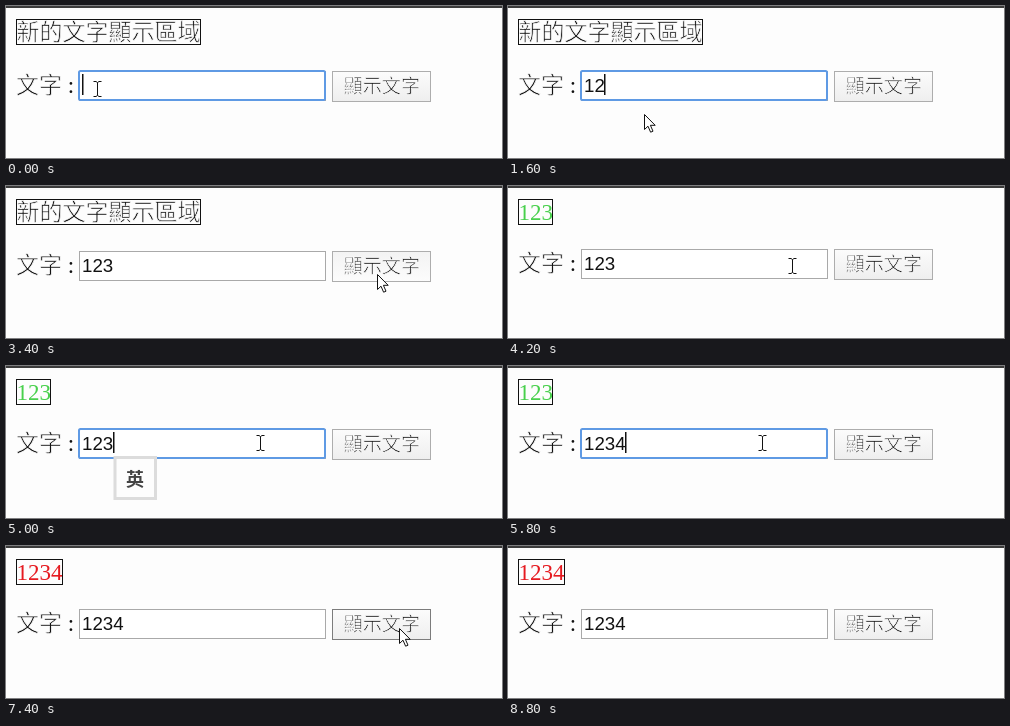
An HTML page that plays this animation: 496 px wide and 152 px high, repeating every 10000 ms.

```html
<!DOCTYPE html>
<html lang="zh-Hant">
<head>
<meta charset="utf-8">
<style>
  html, body { margin: 0; width: 100%; height: 100%; overflow: hidden; background: #fdfdfd; }
  svg { display: block; }
  .page { font: 300 23px "Liberation Serif", "Noto Sans CJK TC", "Noto Sans CJK", serif; }
  .ui { font: 300 18.7px "Liberation Sans", sans-serif; }
  .label { font: 300 19.2px "Noto Sans CJK TC", "Noto Sans CJK", sans-serif; }
  .ime { font: 700 18px "Noto Sans CJK TC", "Noto Sans CJK", sans-serif; }
  /* A background-coloured outline slims the strokes of the glyphs. */
  .thin { stroke: #fdfdfd; stroke-width: .75px; }
</style>
</head>
<body>
<svg width="496" height="152" viewBox="0 0 496 152">
  <defs>
    <linearGradient id="raised" x2="0" y2="1">
      <stop stop-color="#fcfcfc"/><stop offset="1" stop-color="#eeeeee"/>
    </linearGradient>
    <linearGradient id="sunken" x2="0" y2="1">
      <stop stop-color="#f3f3f3"/><stop offset="1" stop-color="#fcfcfc"/>
    </linearGradient>
  </defs>
  <rect width="496" height="152" fill="#fdfdfd"/>
  <rect width="496" height="2" fill="#3c3c3c"/>

  <text id="output" class="page" x="10.5" y="34"></text>
  <rect id="frame" x="10.5" y="13.5" height="25" fill="none" stroke="#111"/>

  <g id="row">
    <text class="page" x="10" y="86.5" fill="#111"><tspan class="thin">文字</tspan> :</text>
    <rect id="field" x="73.5" y="65.5" width="246" height="29" fill="#fff" stroke="#a9a9a9"/>
    <rect id="ring" x="73" y="65" width="246" height="29" rx="1.5" fill="none" stroke="#5f9ae4" stroke-width="2"/>
    <text id="value" class="ui" x="76" y="85.5" fill="#111"></text>
    <rect id="caret" y="68" width="1.5" height="21" fill="#111"/>
    <rect id="button" x="326.5" y="65.5" width="98" height="30"/>
    <text class="label thin" x="337.5" y="87" fill="#111">顯示文字</text>
  </g>

  <g id="ime">
    <rect x="109" y="91.5" width="40.5" height="41" fill="#fdfdfd" stroke="#dcdcdc" stroke-width="3"/>
    <text class="ime" x="129" y="119.5" text-anchor="middle" fill="#444">英</text>
  </g>

  <path id="arrow" d="M.5 .5V15.5L4 12.2L6.6 18.2L9 17.2L6.4 11.3H11.2Z" fill="#fff" stroke="#111"/>
  <path id="beam" d="M-3.5 -7.5H-1L.5 -6.5L2 -7.5H4.5M.5 -6.5V6.5M-3.5 7.5H-1L.5 6.5L2 7.5H4.5" fill="none" stroke="#111"/>
</svg>
<script>
const LOOP = 10000, STEP = 200;
const DIGIT_WIDTH = 10.4;
const $ = id => document.getElementById(id);
const set = (id, attrs) => {
  for (const name in attrs) $(id).setAttribute(name, attrs[name]);
};
const show = (id, on) => set(id, { visibility: on ? "visible" : "hidden" });

// Each track lists [start time, value]; a value holds until the next entry.
const typed = [[0, ""], [1200, "1"], [1600, "12"], [2200, "123"], [5400, "1234"]];
const outputs = [
  [0, { text: "新的文字顯示區域", look: "page thin", width: 184, color: "#111", lift: 0 }],
  [3600, { text: "123", look: "page", width: 34, color: "#48d04c", lift: -2 }],
  [7400, { text: "1234", look: "page", width: 46, color: "#e61a20", lift: -2 }]
];
const focus = [[0, true], [3400, false], [4600, true], [7200, false]];
const press = [[0, false], [3400, true], [3600, false], [7200, true], [7400, false]];
const blink = [[0, true], [400, false], [1000, true], [2800, false], [3200, true],
  [6000, false], [6600, true], [7000, false]];
const popup = [[0, false], [5000, true], [5800, false]];

// Pointer keys: [time, x, y]
const pointer = [[0, 91, 83], [800, 91, 83], [1400, 136, 108], [2200, 136, 108],
  [3200, 371, 88], [3800, 371, 88], [4400, 254, 77], [6000, 254, 77],
  [6400, 353, 80], [7000, 393, 82], [7400, 393, 82], [7600, 401, 107]];
const POINTER_END = 7800;

const at = (track, t) => track.filter(([start]) => start <= t).pop()[1];

function pointerAt(t) {
  const i = pointer.findIndex(key => key[0] > t);
  if (i < 0) return pointer[pointer.length - 1].slice(1);
  const [t0, x0, y0] = pointer[i - 1], [t1, x1, y1] = pointer[i];
  const p = (t - t0) / (t1 - t0), k = p * p * (3 - 2 * p);
  return [Math.round(x0 + (x1 - x0) * k), Math.round(y0 + (y1 - y0) * k)];
}

function render(t) {
  const out = at(outputs, t), text = at(typed, t);
  const focused = at(focus, t), pressed = at(press, t);
  const [x, y] = pointerAt(t);
  const inRow = y > 65 + out.lift && y < 96 + out.lift;
  const overField = inRow && x > 73 && x < 320;
  const overButton = inRow && x > 326 && x < 425 && t < POINTER_END;

  set("frame", { width: out.width });
  set("output", { fill: out.color, class: out.look });
  $("output").textContent = out.text;

  set("row", { transform: `translate(0 ${out.lift})` });
  $("value").textContent = text;
  show("ring", focused);
  show("caret", focused && at(blink, t));
  set("caret", { x: 76 + Math.round(text.length * DIGIT_WIDTH - 0.5) });
  set("button", {
    fill: pressed ? "url(#sunken)" : "url(#raised)",
    stroke: overButton && !pressed ? "#7c7c7c" : "#adadad"
  });
  show("ime", at(popup, t));

  show("arrow", t < POINTER_END && !overField);
  show("beam", t < POINTER_END && overField);
  const move = { transform: `translate(${x} ${y})` };
  set("arrow", move);
  set("beam", move);
}

const start = performance.now();
function tick() {
  const t = (performance.now() - start) % LOOP;
  render(Math.floor(t / STEP) * STEP);
  requestAnimationFrame(tick);
}
tick();
</script>
</body>
</html>
```
